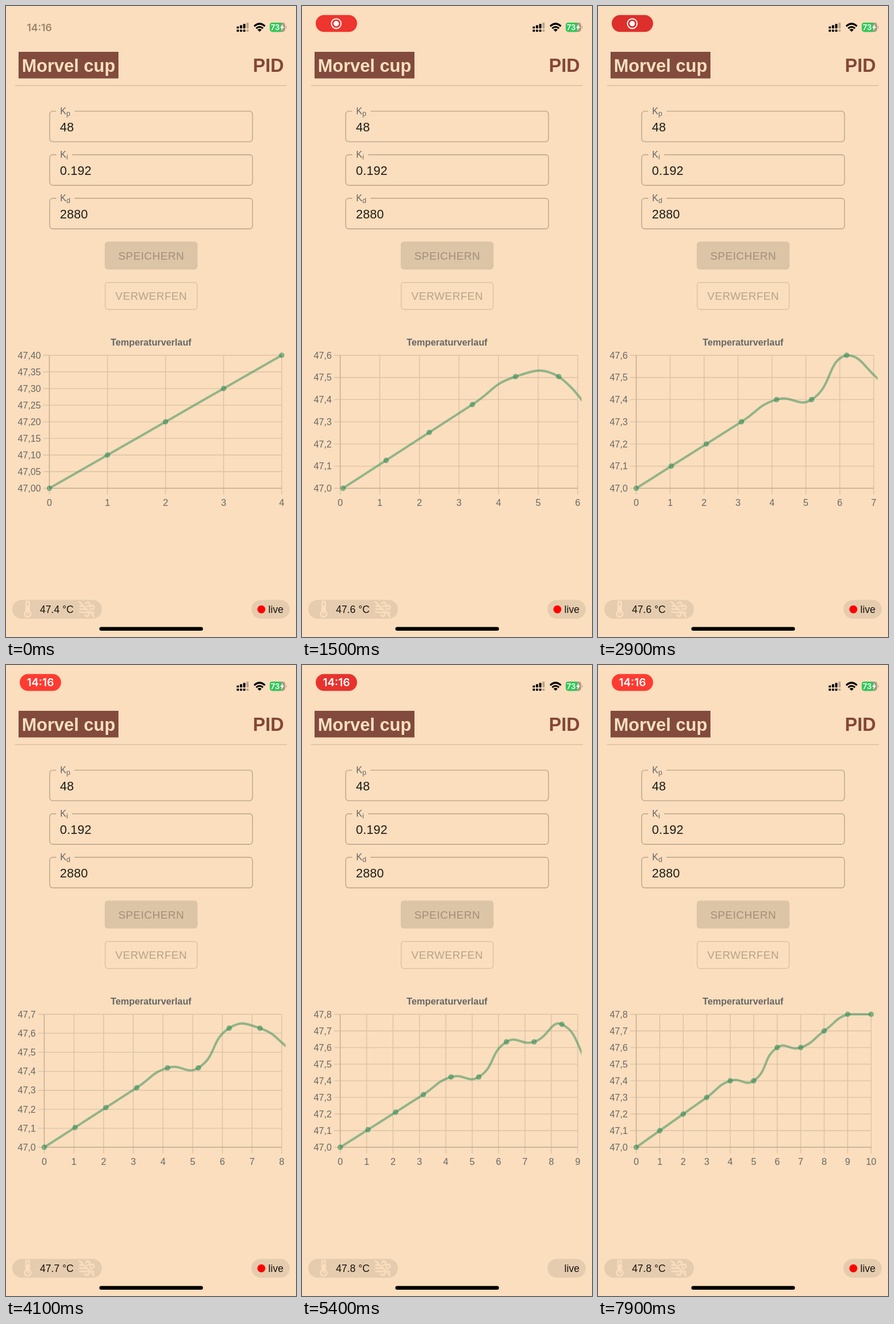
These frames come from a looping animation (508x1102 px, 8 s). An HTML page:

```html
<!DOCTYPE html>
<html lang="de">
<head>
<meta charset="utf-8">
<title>PID</title>
<style>
html, body { margin: 0; width: 100%; height: 100%; overflow: hidden; background: #fadebd; }
svg { display: block; width: 100vw; height: 100vh; }
text { font-family: "Liberation Sans", Arial, sans-serif; }
.ios { font-family: Inter, sans-serif; font-weight: 600; }
.mid { text-anchor: middle; }
.end { text-anchor: end; }
.label { font-size: 16.26px; fill: #666; }
.field { fill: none; stroke: #b9a38a; stroke-width: 1.36; }
.value { font-size: 21.7px; letter-spacing: .2px; fill: #1f1c18; }
.button { font-size: 18.97px; letter-spacing: .54px; fill: #000; fill-opacity: .27; }
.status { font-size: 17.6px; fill: #15120f; }
.icon { fill: none; stroke: #fadebd; stroke-width: 2; stroke-linecap: round; stroke-linejoin: round; }
.grid { fill: none; stroke: #000; stroke-opacity: .125; stroke-width: 1.36; }
.curve { fill: none; stroke: #2e8b57; stroke-opacity: .5; stroke-width: 4.06; }
.dot { fill: #2e8b57; fill-opacity: .5; stroke: #2e8b57; stroke-opacity: .5; stroke-width: 1.36; }
</style>
</head>
<body>
<svg viewBox="0 0 508 1102" preserveAspectRatio="none">
  <defs><clipPath id="area"><rect id="areaBox" y="603" height="246"/></clipPath></defs>
  <rect width="508" height="1102" fill="#fadebd"/>

  <text id="clock" class="ios mid" x="58.5" y="43.5" font-size="17.8" fill="#9a846c">14:16</text>
  <g id="rec">
    <rect id="recBox" x="24" y="15.8" width="72.5" height="29.4" rx="14.7"/>
    <g id="recIcon">
      <circle cx="60" cy="30.7" r="8.5" fill="none" stroke="#fff" stroke-width="1.9"/>
      <circle cx="60" cy="30.7" r="4.7" fill="#fff"/>
    </g>
    <text id="recTime" class="ios mid" x="60.2" y="37.2" font-size="19.3" fill="#fff">14:16</text>
  </g>

  <g id="signal"></g>
  <g fill="none" stroke="#000" stroke-width="3.1">
    <path d="M434.8 35.4Q444.2 26.6 453.6 35.4"/>
    <path d="M438.3 39.2Q444.2 33.8 450.1 39.2"/>
  </g>
  <path d="M440.6 41.4Q444.2 38.6 447.8 41.4L444.2 45Z"/>
  <rect x="462" y="29" width="27" height="16.2" rx="4.6" fill="#a99880"/>
  <path d="M466.6 29H482V45.2H466.6A4.6 4.6 0 0 1 462 40.6V33.6A4.6 4.6 0 0 1 466.6 29Z" fill="#34c759"/>
  <path d="M490.4 34.5Q493 37 490.4 39.8Z" fill="#a99880"/>
  <text class="ios mid" x="471.6" y="41.9" font-size="13.2" fill="#fff">73</text>
  <path d="M485.2 31.5L480 38H483L481.6 43L487.4 36.3H484.2Z" fill="#fff"/>

  <rect x="22" y="80" width="175" height="46.5" fill="#824b3d"/>
  <text class="mid" x="109.5" y="114.5" font-size="31" font-weight="700" fill="#fae0bf">Morvel cup</text>
  <text class="end" x="486.8" y="114.6" font-size="32.5" font-weight="700" fill="#844637">PID</text>
  <path d="M16 139H492" stroke="#d9bfa2" stroke-width="1.4"/>

  <g id="fields"></g>
  <rect x="173" y="411.5" width="162.5" height="48.7" rx="5.4" fill="#dcc4a6"/>
  <text class="button mid" x="254.4" y="442.7">SPEICHERN</text>
  <rect x="173.7" y="482.7" width="161.2" height="47.3" rx="5" fill="none" stroke="#dcc4a6" stroke-width="1.4"/>
  <text class="button mid" x="254.4" y="513.2">VERWERFEN</text>

  <text class="label mid" x="254" y="592.6" font-weight="700">Temperaturverlauf</text>
  <g id="axes"></g>
  <path id="curve" class="curve" clip-path="url(#area)"/>
  <g id="dots"></g>

  <rect x="11" y="1037.3" width="157" height="32.8" rx="16.4" fill="#e6ccae"/>
  <g class="icon" transform="translate(21.7 1037.2) scale(1.355)">
    <path d="M14 4v10.5a4 4 0 1 1-4 0V4a2 2 0 0 1 4 0ZM12 8v9.5M12 18h.01"/>
  </g>
  <text id="temp" class="status" x="59.5" y="1059.8"></text>
  <g class="icon" transform="translate(125.2 1037.2) scale(1.355)">
    <path d="M2.5 2.5L21.5 21.5M3 8h5M12 8h1.5a2.5 2.5 0 1 0-2.4-3.2M3 12h9M16 12h3a2.5 2.5 0 1 0-2.5-2.8M3 16h9a2.5 2.5 0 1 1-2.4 3.2M18 15.5a2.5 2.5 0 0 1 3 2"/>
  </g>
  <rect x="430" y="1037.3" width="67" height="32.8" rx="16.4" fill="#e6ccae"/>
  <circle id="live" cx="447.3" cy="1053.7" r="7" fill="#f00"/>
  <text class="status" x="459.6" y="1059.8">live</text>
  <rect x="163.5" y="1084.4" width="181.5" height="6.6" rx="3.3"/>
</svg>
<script>
const LOOP = 8000, ANIM = 1000, TENSION = 0.5;
const TOP = 610, BOTTOM = 842.3, MARGIN = 6.8, TICK = 10.8;
const tenths = [0, 1, 2, 3, 4, 4, 6, 6, 7, 8, 8];
const arrivals = [100, 1350, 2570, 3820, 5195, 6750];
const $ = id => document.getElementById(id);
const clamp = (v, lo, hi) => Math.min(Math.max(v, lo), hi);
const ramp = (t, from, to) => clamp((t - from) / (to - from), 0, 1);
const num = v => v.toFixed(2);

function drawFields() {
  const rows = [["p", "48", 120], ["i", "0.192", 116], ["d", "2880", 120]];
  $("fields").innerHTML = rows.map(([sub, value, gap], i) => {
    const y = 183.6 + 76.1 * i;
    return `<path class="field" d="M${gap} ${y}H426.4a5.4 5.4 0 0 1 5.4 5.4v42.7a5.4 5.4 0 0 1-5.4 5.4H81.9a5.4 5.4 0 0 1-5.4-5.4V${y + 5.4}a5.4 5.4 0 0 1 5.4-5.4H88"/>
      <text class="label" x="94.8" y="${y + 5.2}">K<tspan font-size="12.4" dy="3">${sub}</tspan></text>
      <text class="value" x="94.5" y="${y + 35}">${value}</text>`;
  }).join("");
}

function drawSignal() {
  let s = "";
  for (let i = 0; i < 4; i++) {
    const x = 404 + 5.7 * i, h = 3.6 + 2.2 * i, fill = i < 3 ? "#000" : "#b9a58c";
    s += `<rect x="${x}" y="${39.3 - h}" width="4" height="${h}" rx="1" fill="${fill}"/>
      <rect x="${x}" y="41.2" width="4" height="3.8" rx="1" fill="${fill}"/>`;
  }
  $("signal").innerHTML = s;
}

// Axis layout for a chart holding n points
function layout(n) {
  const fine = n < 7;
  return {
    n, fine,
    left: fine ? 76 : 67,
    right: n > 10 ? 478.5 : 483,
    max: Math.max(...tenths.slice(0, n))
  };
}
const xAt = (s, i) => s.left + i * (s.right - s.left) / (s.n - 1);
const yAt = (s, v) => BOTTOM - v / s.max * (BOTTOM - TOP);

function drawAxes(s) {
  let lines = "", labels = "";
  for (let i = 0; i < s.n; i++) {
    const x = num(xAt(s, i));
    lines += `M${x} ${TOP}V${BOTTOM + TICK}`;
    labels += `<text class="label mid" x="${x}" y="872.8">${i}</text>`;
  }
  for (let v = 0; v <= s.max; v += s.fine ? 0.5 : 1) {
    const y = yAt(s, v), name = (47 + v / 10).toFixed(s.fine ? 2 : 1).replace(".", ",");
    lines += `M${s.left - TICK} ${num(y)}H${s.right}`;
    labels += `<text class="label end" x="${s.left - 14.9}" y="${num(y + 5.7)}">${name}</text>`;
  }
  $("axes").innerHTML = `<path class="grid" d="${lines}"/>
    <path class="grid" d="M${s.left} ${TOP}V${BOTTOM}H${s.right}"/>${labels}`;
  $("areaBox").setAttribute("x", s.left - MARGIN);
  $("areaBox").setAttribute("width", s.right - s.left + 2 * MARGIN);
}

function inArea(p, s, m) {
  return p.x > s.left - m && p.x < s.right + m && p.y > TOP - m && p.y < BOTTOM + m;
}

// Cubic spline whose handles are kept inside the plot area
function splinePath(pts, s) {
  const last = pts.length - 1;
  const handles = pts.map((p, i) => {
    const a = pts[Math.max(i - 1, 0)], b = pts[Math.min(i + 1, last)];
    const d0 = Math.hypot(p.x - a.x, p.y - a.y), d1 = Math.hypot(b.x - p.x, b.y - p.y);
    const handle = k => {
      let x = p.x + k * (b.x - a.x), y = p.y + k * (b.y - a.y);
      if (inArea(p, s, 0.7)) {
        x = clamp(x, s.left, s.right);
        y = clamp(y, TOP, BOTTOM);
      }
      return num(x) + " " + num(y);
    };
    return [handle(-TENSION * d0 / (d0 + d1)), handle(TENSION * d1 / (d0 + d1))];
  });
  return pts.map((p, i) => {
    const at = num(p.x) + " " + num(p.y);
    return i ? `C${handles[i - 1][1]} ${handles[i][0]} ${at}` : "M" + at;
  }).join("");
}

let shown = 0;
function drawChart(t) {
  const step = arrivals.filter(a => a <= t).length;
  const now = layout(5 + step), old = layout(Math.max(4 + step, 5));
  const rest = step ? (1 - ramp(t, arrivals[step - 1], arrivals[step - 1] + ANIM)) ** 4 : 0;
  if (shown !== now.n) {
    shown = now.n;
    drawAxes(now);
    $("temp").textContent = (47 + tenths[shown - 1] / 10).toFixed(1) + " °C";
  }
  const mix = (a, b) => b + (a - b) * rest;
  const pts = tenths.slice(0, now.n).map((v, i) => ({
    x: mix(xAt(old, i), xAt(now, i)),
    y: mix(i < old.n ? yAt(old, v) : BOTTOM, yAt(now, v))
  }));
  $("curve").setAttribute("d", splinePath(pts, now));
  $("dots").innerHTML = pts.filter(p => inArea(p, now, MARGIN))
    .map(p => `<circle class="dot" cx="${num(p.x)}" cy="${num(p.y)}" r="4.06"/>`).join("");
}

function drawStatus(t) {
  const grow = ramp(t, 150, 450), swap = ramp(t, 3350, 3550);
  const pulse = Math.cos(2 * Math.PI * t / 2000);
  const rgb = [238 + 18 * pulse, 53 + 6 * pulse, 46 + 3 * pulse].map(Math.round);
  $("clock").setAttribute("opacity", 1 - ramp(t, 0, 200));
  $("rec").setAttribute("opacity", grow);
  $("recBox").setAttribute("fill", `rgb(${rgb})`);
  $("recIcon").setAttribute("opacity", 1 - swap);
  $("recTime").setAttribute("opacity", swap);
  const beat = t % 1000;
  $("live").setAttribute("opacity", beat > 110 && beat < 490 ? 0 : 1);
}

function render(t) {
  drawChart(t);
  drawStatus(t);
}

drawFields();
drawSignal();
render(0);
const start = performance.now();
(function tick() {
  render((performance.now() - start) % LOOP);
  requestAnimationFrame(tick);
})();
</script>
</body>
</html>
```
